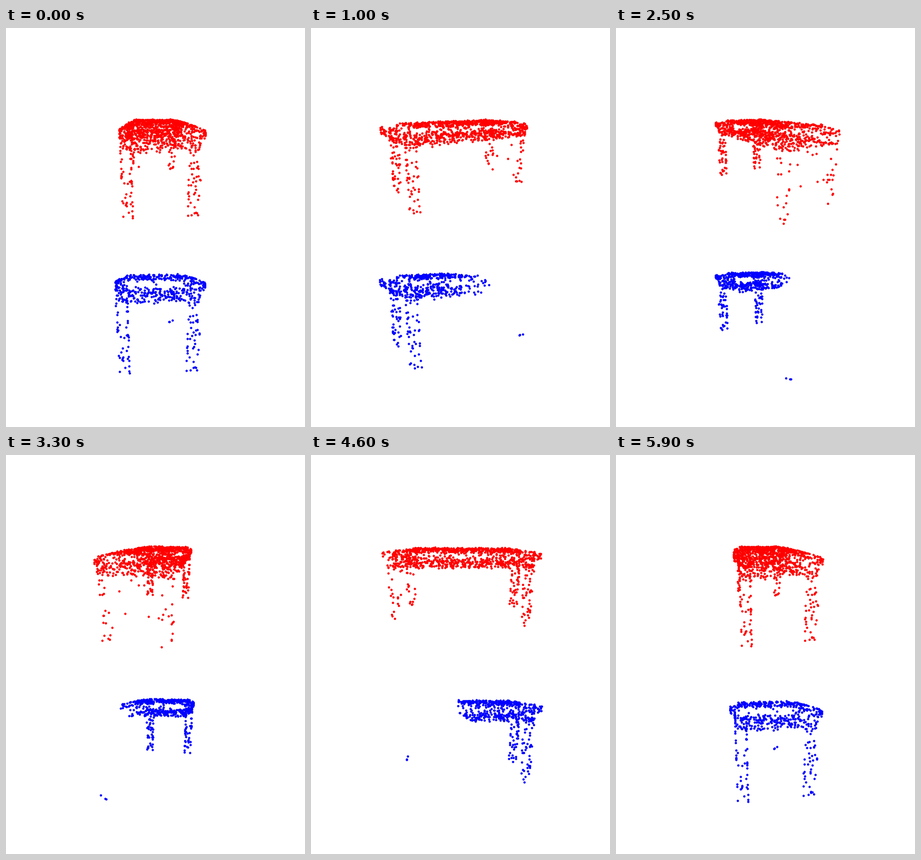
These frames come from a looping animation (600x800 px, 6 s). A matplotlib script:

```python
import numpy as np
import matplotlib.pyplot as plt
from matplotlib.animation import FuncAnimation

W, H = 600, 800
FRAMES = 60
FOCAL = 382
SIN_E, COS_E = 0.215, 0.977
START = 3.2          # heading of the table in degrees
CENTER_X, CENTER_Y = 301, 246
ROW_GAP = 308
FOOT = np.array([(-118, 53, -71), (-118, 46, -75), (-118, 44, -76)])

rng = np.random.default_rng(11)


def ring(n, hx, hy):
    """Random points on the outline of a rectangle."""
    t = rng.uniform(0, hx + hy, n)
    along = t < hx
    x = np.where(along, t, hx) * rng.choice([-1, 1], n)
    y = np.where(along, hy, t - hx) * rng.choice([-1, 1], n)
    return x, y


def stack(x, y, z):
    return np.column_stack(np.broadcast_arrays(x, y, z))


def plate(n, hx, hy, low, high):
    return stack(rng.uniform(-hx, hx, n), rng.uniform(-hy, hy, n),
                 rng.uniform(low, high, n))


def tube(n, x0, y0, hx, hy, low, high):
    x, y = ring(n, hx, hy)
    return stack(x0 + x, y0 + y, rng.uniform(low, high, n))


def table_edge(outer, rim):
    """Rounded border of the top: a sloping band and its thin rim."""
    x, y = ring(outer + rim, 145, 66)
    r = ((x / 145) ** 4 + (y / 66) ** 4) ** 0.25
    k = np.append(rng.uniform(0.7, 1, outer), np.ones(rim))
    z = np.append(57 - 20 * (k[:outer] - 0.7), rng.uniform(43, 52, rim))
    return stack(x / r * k, 4 + y / r * k, z)


def build_table():
    parts = [plate(280, 105, 50, 54.5, 57),
             table_edge(80, 140),
             plate(290, 125, 55, 27, 31),
             tube(150, 0, 0, 125, 55, 27, 48)]
    for sx in (1, -1):
        for sy in (1, -1):
            x, y = 118 * sx, 48 * sy
            parts.append(tube(12, x, y, 7, 7, 27, 46))
            parts.append(tube(44 if sx > 0 else 16, x, y, 7, 7, -77, 27))
    strays = [(-118, 16, -30), (-118, -20, -31), (-118, -35, -31),
              (-118, 24, 4), (-118, -6, 15), (-118, 5, 21), (-118, -14, 15)]
    return np.vstack([*parts, strays, FOOT])


full = build_table()

# The partial scan keeps one half of the table and a bit of one foot.
x, y, z = full.T
cut = 4 - 0.2 * y + 0.4 * np.clip(46 - z, 0, 20)
part = np.vstack([full[x > cut], FOOT]) * 1.045 + (-7, -3, 0)


def project(points, frame, cy):
    a = np.radians(START - 360 * frame / FRAMES)
    x, y, z = points.T
    u = x * np.sin(a) + y * np.cos(a)
    v = -x * np.cos(a) + y * np.sin(a)
    scale = FOCAL / (FOCAL + v * COS_E - z * SIN_E)
    return CENTER_X + u * scale, cy - (z * COS_E + v * SIN_E) * scale


fig = plt.figure(figsize=(W / 100, H / 100), dpi=100, facecolor="white")
ax = fig.add_axes([0, 0, 1, 1])
ax.set_xlim(0, W)
ax.set_ylim(H, 0)
ax.axis("off")

clouds = []
for points, color, cy in ((full, "red", CENTER_Y),
                          (part, "blue", CENTER_Y + ROW_GAP)):
    dots, = ax.plot([], [], "o", color=color, ms=3.3, mew=0)
    clouds.append((dots, points, cy))


def update(frame):
    for dots, points, cy in clouds:
        dots.set_data(*project(points, frame, cy))
    return [c[0] for c in clouds]


anim = FuncAnimation(fig, update, frames=FRAMES, interval=100,
                     repeat=True, repeat_delay=0)
plt.show()
```
